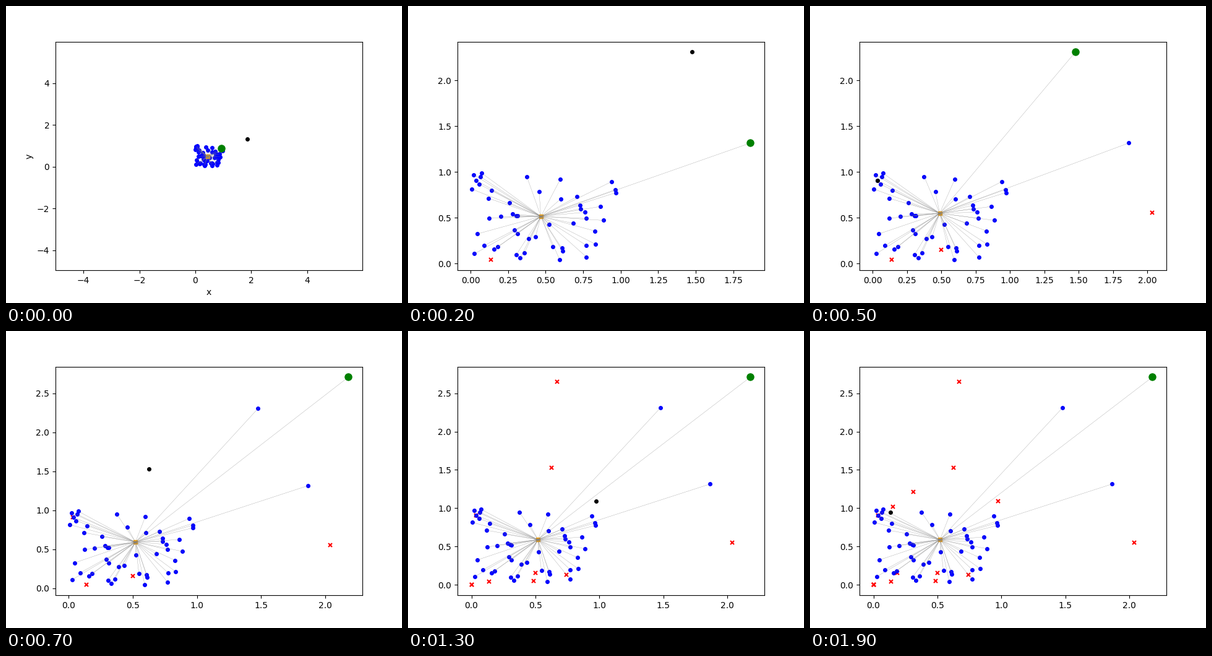
A matplotlib script for the animation above (2000 ms loop, 640 by 480 pixels).

```python
import numpy as np
import matplotlib.pyplot as plt
from matplotlib.animation import FuncAnimation

STEP_MS = 100
START = np.random.RandomState(42).rand(50, 2)

# One trial point per step
TRIALS = np.array([
    (1.865, 1.316), (.136, .041), (1.476, 2.308), (.5, .155), (2.037, .555),
    (.034, .909), (2.18, 2.711), (.625, 1.53), (.488, .048), (0, 0),
    (.667, 2.648), (.744, .129), (0, 0), (.976, 1.09), (.313, 1.21),
    (0, 0), (.188, .153), (0, 0), (.154, 1.016), (.134, .946),
])

fig, ax = plt.subplots(figsize=(6.4, 4.8), dpi=100)


def search(step):
    """Replay the search: a trial joins the swarm if its x + y beats the best."""
    swarm, failed = list(START), []
    best = max(swarm, key=sum)
    for trial in TRIALS[:step]:
        if sum(trial) > sum(best):
            best = trial
            swarm.append(trial)
        else:
            failed.append(trial)
    return np.array(swarm), np.array(failed).reshape(-1, 2), best


def dots(points, marker, color, size=4, edge=1):
    x, y = np.atleast_2d(points).T
    ax.plot(x, y, marker, color=color, markersize=size, markeredgewidth=edge)


def draw(step):
    ax.clear()
    swarm, failed, best = search(step)
    center = swarm.mean(axis=0)

    if len(failed):
        dots(failed, "x", "red", edge=1.5)
    dots(swarm, "o", "blue")
    dots(center, "s", "orange")
    for x, y in swarm:
        ax.plot([center[0], x], [center[1], y], color="gray", lw=0.2)
    dots(best, "o", "green", 8)
    dots(TRIALS[step], "o", "black")

    # Only the opening view has fixed limits and axis names
    if step == 0:
        ax.set(xlim=(-5, 5.98), ylim=(-4.96, 5.99), xlabel="x", ylabel="y")


anim = FuncAnimation(fig, draw, frames=len(TRIALS), init_func=lambda: None,
                     interval=STEP_MS, repeat=True, repeat_delay=0)
plt.show()
```
